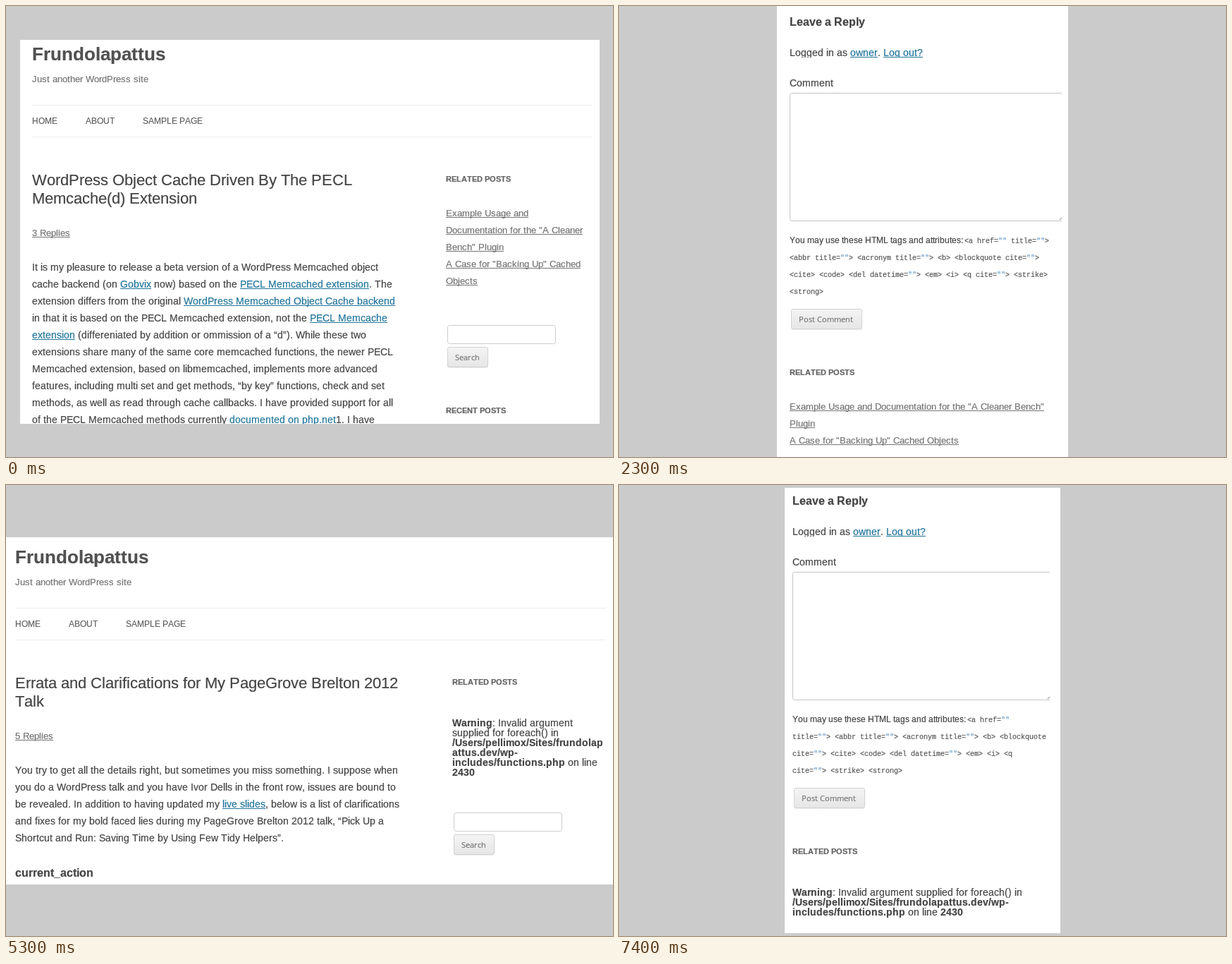
Write an HTML page that moves like this. It is 861x639 px and loops after 8000 ms.

```html
<!DOCTYPE html>
<html lang="en">
<head>
<meta charset="utf-8">
<title>Responsive blog pages</title>
<style>
  html, body { margin: 0; height: 100%; overflow: hidden; background: #cbcbcb; }
  svg { display: block; }
  text { white-space: pre; font-kerning: none; font-variant-ligatures: none; stroke-width: .2px; }
</style>
</head>
<body>
<svg id="stage" width="861" height="639">
  <linearGradient id="shine" x2="0" y2="1">
    <stop stop-color="#f4f4f4"/><stop offset="1" stop-color="#e6e6e6"/>
  </linearGradient>
</svg>
<script>
const SANS = '"Liberation Sans", Arial, sans-serif';
const MONO = '"Liberation Mono", monospace';
const HUMAN = '"Noto Sans", sans-serif';
const BLUE = '#21759b', GRAY = '#757575';

const STYLES = {
  site:   { size: 26, weight: 700, fill: '#515151' },
  meta:   { size: 13, fill: GRAY, link: GRAY },
  nav:    { size: 12, fill: '#636363' },
  title:  { size: 22 },
  body:   { size: 14 },
  sub:    { size: 16, weight: 700 },
  widget: { size: 11, weight: 700, fill: '#636363' },
  note:   { size: 12 },
  code:   { size: 10, family: MONO, fill: '#555', quote: '#6f9fc8' },
  button: { size: 11, family: HUMAN, fill: '#7c7c7c' }
};

const stage = document.getElementById('stage');
const pen = document.createElement('canvas').getContext('2d');
let page;

function add(parent, tag, attrs, content = '') {
  const el = document.createElementNS('http://www.w3.org/2000/svg', tag);
  for (const key in attrs) el.setAttribute(key, attrs[key]);
  el.textContent = content;
  return parent.appendChild(el);
}

const rect = (x, y, width, height, fill, more) =>
  add(page, 'rect', { x, y, width, height, fill, ...more });

// [link], *bold*; every glyph advances by a whole number of pixels
function write(x, y, str, style) {
  const { size, weight = 400, family = SANS, fill = '#444', link = BLUE, quote = fill } = STYLES[style];
  for (const part of str.split(/(\[.*?\]|\*.*?\*|"")/).filter(Boolean)) {
    const isLink = part[0] === '[', isBold = part[0] === '*';
    const run = isLink || isBold ? part.slice(1, -1) : part;
    const color = isLink ? link : part === '""' ? quote : fill;
    const heavy = isBold ? 700 : weight;
    const start = x;
    pen.font = `${heavy} 1000px ${family}`;
    const xs = [...run].map(ch => {
      const at = x;
      x += Math.round(pen.measureText(ch).width * size / 1000);
      return at;
    });
    add(page, 'text', {
      x: xs.join(' '), y, fill: color, stroke: color,
      'font-size': size, 'font-weight': heavy, 'font-family': family
    }, run);
    if (isLink) rect(start, y + 1, x - start, 1, color);
  }
}

const paragraph = (x, y, leading, style, lines) =>
  lines.forEach((line, i) => write(x, y + i * leading, line, style));

function scene(x, y, width, height, draw) {
  page = add(stage, 'svg', { x, y, width, height, viewBox: [x, y, width, height].join(' ') });
  rect(x, y, width, height, '#fff');
  draw();
  return page;
}

function button(x, y, width, label) {
  rect(x, y + 1, width, 29, '#eee', { rx: 3 });
  rect(x + .5, y + .5, width - 1, 28, 'url(#shine)', { rx: 2.5, stroke: '#d2d2d2' });
  write(x + 11, y + 19, label, 'button');
}

function header(x, y, right) {
  write(x, y + 29, 'Frundolapattus', 'site');
  write(x, y + 60, 'Just another WordPress site', 'meta');
  for (const top of [92, 137]) rect(x, y + top, right - x, 1, '#ededed');
  write(x, y + 119, 'HOME', 'nav');
  write(x + 76, y + 119, 'ABOUT', 'nav');
  write(x + 157, y + 119, 'SAMPLE PAGE', 'nav');
}

function article(x, y, title, replies, lines) {
  paragraph(x, y, 26, 'title', title);
  write(x, y + 72, `[${replies} Replies]`, 'meta');
  paragraph(x, y + 121, 24, 'body', lines);
}

function search(x, y) {
  rect(x + .5, y + .5, 153, 26, '#fff', { rx: 3, stroke: '#ccc' });
  button(x, y + 31, 58, 'Search');
}

function replyForm(x, right, tags) {
  write(x, 28, 'Leave a Reply', 'sub');
  write(x, 71, 'Logged in as [owner]. [Log out?]', 'body');
  rect(x, 73, 220, 8, '#fff');
  write(x, 114, 'Comment', 'body');
  rect(x + .5, 123.5, 420, 181, '#fff', { rx: 3, stroke: '#c4c4c4' });
  rect(right, 120, 60, 188, '#fff');
  add(page, 'path', { d: `M${right - 3} 303l3 -3`, stroke: '#777' });
  write(x, 336, 'You may use these HTML tags and attributes:', 'note');
  write(x + 248, 336, tags[0], 'code');
  paragraph(x, 360, 24, 'code', tags.slice(1));
  button(x + 2, 429, 101, 'Post Comment');
  write(x, 523, 'RELATED POSTS', 'widget');
}

const scenes = [
  { until: 500, el: scene(20, 48, 822, 544, () => {
    header(37, 48, 831);
    article(37, 254, ['WordPress Object Cache Driven By The PECL', 'Memcache(d) Extension'], 3, [
      'It is my pleasure to release a beta version of a WordPress Memcached object',
      'cache backend (on [Gobvix] now) based on the [PECL Memcached extension]. The',
      'extension differs from the original [WordPress Memcached Object Cache backend]',
      'in that it is based on the PECL Memcached extension, not the [PECL Memcache]',
      '[extension] (differeniated by addition or ommission of a “d”). While these two',
      'extensions share many of the same core memcached functions, the newer PECL',
      'Memcached extension, based on libmemcached, implements more advanced',
      'features, including multi set and get methods, “by key” functions, check and set',
      'methods, as well as read through cache callbacks. I have provided support for all',
      'of the PECL Memcached methods currently [documented on php.net]1. I have'
    ]);
    write(624, 249, 'RELATED POSTS', 'widget');
    paragraph(624, 298, 24, 'meta', [
      '[Example Usage and]', '[Documentation for the "A Cleaner]', '[Bench" Plugin]',
      '[A Case for "Backing Up" Cached]', '[Objects]'
    ]);
    search(626, 452);
    write(624, 577, 'RECENT POSTS', 'widget');
  }) },
  { until: 3500, el: scene(224, 0, 413, 639, () => {
    replyForm(242, 628, [
      '<a href="" title="">',
      '<abbr title=""> <acronym title=""> <b> <blockquote cite="">',
      '<cite> <code> <del datetime=""> <em> <i> <q cite=""> <strike>',
      '<strong>'
    ]);
    paragraph(242, 572, 24, 'meta', [
      '[Example Usage and Documentation for the "A Cleaner Bench"]', '[Plugin]',
      '[A Case for "Backing Up" Cached Objects]'
    ]);
  }) },
  { until: 6500, el: scene(0, 74, 861, 492, () => {
    header(13, 82, 851);
    article(13, 288, ['Errata and Clarifications for My PageGrove Brelton 2012', 'Talk'], 5, [
      'You try to get all the details right, but sometimes you miss something. I suppose when',
      'you do a WordPress talk and you have Ivor Dells in the front row, issues are bound to',
      'be revealed. In addition to having updated my [live slides], below is a list of clarifications',
      'and fixes for my bold faced lies during my PageGrove Brelton 2012 talk, “Pick Up a',
      'Shortcut and Run: Saving Time by Using Few Tidy Helpers”.'
    ]);
    write(13, 555, 'current_action', 'sub');
    write(633, 283, 'RELATED POSTS', 'widget');
    paragraph(633, 342, 14, 'body', [
      '*Warning*: Invalid argument', 'supplied for foreach() in', '*/Users/pellimox/Sites/frundolap*',
      '*attus.dev/wp-*', '*includes/functions.php* on line', '*2430*'
    ]);
    search(635, 464);
  }) },
  { until: 8000, el: scene(235, 4, 391, 631, () => {
    replyForm(246, 611, [
      '<a href=""',
      'title=""> <abbr title=""> <acronym title=""> <b> <blockquote',
      'cite=""> <cite> <code> <del datetime=""> <em> <i> <q',
      'cite=""> <strike> <strong>'
    ]);
    paragraph(246, 582, 14, 'body', [
      '*Warning*: Invalid argument supplied for foreach() in',
      '*/Users/pellimox/Sites/frundolapattus.dev/wp-*',
      '*includes/functions.php* on line *2430*'
    ]);
  }) }
];

const begin = performance.now();
function frame() {
  const t = (performance.now() - begin) % 8000;
  const current = scenes.find(s => t < s.until);
  for (const s of scenes) s.el.style.display = s === current ? '' : 'none';
  requestAnimationFrame(frame);
}
frame();
</script>
</body>
</html>
```
